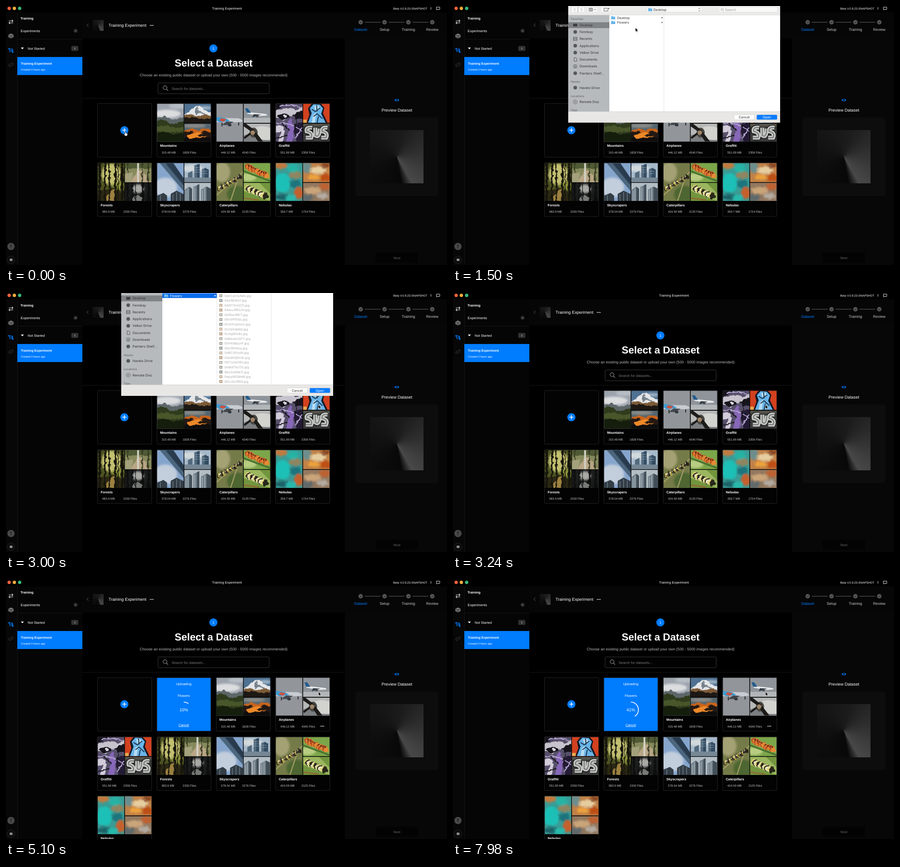
Animation of 976x574 px, one loop 8 s. Source, as an HTML page:

```html
<!DOCTYPE html>
<html lang="en">
<head>
<meta charset="utf-8">
<title>Training Experiment</title>
<style>
  html, body { margin: 0; width: 100%; height: 100%; overflow: hidden; background: #000; }
  #stage { position: relative; width: 976px; height: 574px; overflow: hidden; }
  #stage > svg { position: absolute; inset: 0; }
  text { font-family: "Liberation Sans", Arial, sans-serif; fill: #fff; text-rendering: geometricPrecision; white-space: pre; }
  #sheet text { font-family: Inter, sans-serif; fill: #333; }
  .cone { position: absolute; background: conic-gradient(from 150deg, #484848, #262626 10deg, #080808 20deg, #0c0c0c 80deg, #141414 160deg, #1c1c1c 225deg, #333 300deg, #484848); }
</style>
</head>
<body>
<div id="stage">
  <svg id="view" width="976" height="574"></svg>
  <div class="cone" style="left:806px;top:275px;width:118px;height:118px"></div>
  <div class="cone" style="left:192px;top:31px;width:24px;height:24px"></div>
</div>
<script>
const BLUE = '#007cff';

// Shape helpers; text is placed by its vertical centre.
const path = (fill, d, more = '') => `<path fill="${fill}" d="${d}" ${more}/>`;
const line = (color, width, d, more = '') =>
  `<path fill="none" stroke="${color}" stroke-width="${width}" d="${d}" ${more}/>`;
const oval = (fill, x, y, rx, ry = rx, more = '') =>
  `<ellipse fill="${fill}" cx="${x}" cy="${y}" rx="${rx}" ry="${ry}" ${more}/>`;
const box = (fill, x, y, w, h, more = '') =>
  `<rect fill="${fill}" x="${x}" y="${y}" width="${w}" height="${h}" ${more}/>`;
const text = (x, y, size, str, more = '') =>
  `<text x="${x}" y="${y + size * .36}" font-size="${size}" ${more}>${str}</text>`;
const MID = 'text-anchor="middle"', BOLD = 'font-weight="700"';
const plus = (x, y, r, color, width) => line(color, width, `M${x - r} ${y}h${2 * r}M${x} ${y - r}v${2 * r}`);
const dots = (x, y) => [-3, 0, 3].map(d => oval('#fff', x + d, y, 1)).join('');
const lens = (x, y, r, color) =>
  line(color, r / 4, `M${x + r * .7} ${y + r * .7}l${r * .9} ${r * .9}`) +
  `<circle cx="${x}" cy="${y}" r="${r}" fill="none" stroke="${color}" stroke-width="${r / 4}"/>`;

// Photo helpers: backdrops overlap the edges so that roughened shapes leave no gap.
const fill = color => box(color, -8, -8, 75, 100);
const soft = shapes => `<g filter="url(#soft)">${shapes}</g>`;
const rough = shapes => `<g filter="url(#rough)">${shapes}</g>`;
const bars = (color, list) => list.map(([x, w]) => box(color, x, -5, w, 94)).join('');
const beads = (n, x, y, dx, dy, r, colors) => Array.from({ length: n }, (_, i) =>
  oval(colors[i % colors.length], x + dx * i, y + dy * i, r)).join('');
const LETTERS = 'M20 9Q6 7 8 17Q22 20 18 31L6 31M27 9V26Q36 33 37 11M54 9Q41 7 42 17Q56 20 51 31L40 31';

// Three photos per set: tall (59 x 84), upper (59 x 42), lower (59 x 40).
const SETS = [
  ['Mountains', '315.48 MB', '1828 Files',
    fill('#9ca3ad') + soft(oval('#dcdddf', 22, 22, 30, 9) + oval('#b7bdc5', 46, 5, 20, 6)) +
    rough(path('#5d6668', 'M-5 34L14 27L34 36L65 28V60H-5Z') + path('#2f3b1c', 'M-5 39L12 34L30 45L48 42L65 36V92H-5Z') +
      path('#48562a', 'M-5 52L20 48L44 54L65 48V60L30 64L-5 60Z') + path('#151d0c', 'M-5 66L20 62L36 68L65 63V92H-5Z')),
    fill('#4f7192') + soft(oval('#9db2c4', 46, 9, 16, 4)) +
    rough(path('#e4e6e8', 'M-5 27L12 15L27 4L36 6L46 14L65 23V48H-5Z') +
      path('#77828c', 'M29 5L31 14L42 20L51 25L33 20L24 25L25 13Z') + path('#7c5a38', 'M-5 26L14 23L27 29L43 23L65 28V48H-5Z') +
      path('#1d1814', 'M-5 31L22 30L36 34L65 31V48H-5Z')),
    fill('#53656f') + soft(oval('#8f8d87', 22, 5, 26, 4)) +
    rough(path('#c8641c', 'M-5 19L15 10L29 15L45 9L65 17V46H-5Z') + path('#231813', 'M-5 22L14 15L28 25L44 15L65 23V46H-5Z') +
      path('#ec8828', 'M6 26L31 18L40 22L26 27L54 29L10 33Z') + path('#0f0d0c', 'M-5 33L26 33L65 30V46H-5Z'))],
  ['Airplanes', '446.12 MB', '4340 Files',
    fill('#92959a') + path('#c7cdd3', 'M0 31L48 32Q57 34 58 39L50 41L0 41Z') +
    path('#3f9bd0', 'M0 29L20 32L30 38L7 41L0 37Z') + path('#c95444', 'M10 32L22 34L16 40L6 37Z') +
    path('#43484f', 'M22 39L38 40L25 47H12Z') + oval('#33383d', 29, 47, 4, 3) + line('#24272a', 2, 'M12 42V50M49 41V48'),
    fill('#8e949a') + box('#b3b6b8', 0, 31, 59, 11) + path('#e6e8e9', 'M6 18L45 22Q54 23 51 26L35 27L8 22Z') +
    path('#245b8c', 'M3 10L9 10L16 20L7 20Z') + path('#353d47', 'M22 23L38 24L19 30Z') + oval('#4b5157', 30, 28, 3, 2),
    fill('#b6b8b8') + path('#7b7f81', 'M0 26L20 20L59 30V40H0Z') + path('#d2d2cf', 'M22 10Q40 2 59 9V36Q37 38 22 29Z') +
    oval('#4a4742', 22, 20, 9, 11) + path('#1c1b1a', 'M20 20L0 6V0H5L26 16ZM20 22L32 40H43L27 19ZM17 23L2 34L0 30L16 18Z') +
    oval('#9c8467', 20, 20, 5)],
  ['Graffiti', '551.99 MB', '2358 Files',
    fill('#57506b') + rough(path('#c6c3cd', 'M-5 18Q22 4 45 14L65 4V24Q36 19 19 38L-5 30Z') +
      path('#17141c', 'M2 27Q20 16 32 28Q22 38 7 34ZM38 24L57 15L65 31L43 34ZM-5 -5H28L9 10L-5 16Z') + oval('#d7d7dd', 20, 28, 4, 3) +
      path('#8767b8', 'M31 31Q46 49 35 92H21Q29 60 24 45Z') + path('#d2cbd9', 'M-5 50Q17 44 21 60L12 92H4L11 62L-5 66Z') +
      path('#231a33', 'M39 48L65 38V78L46 92Z') + line('#b3a6d0', 2.5, 'M0 43Q31 39 59 61M41 78L58 53M8 6Q30 -2 59 10') +
      line('#17141c', 2.5, 'M0 76L24 70M14 44L30 60M46 36L40 60')),
    fill('#d3411f') + path('#121b29', 'M8 42L14 24L11 10L20 -2H38L47 9L44 21L54 42Z') +
    path('#69b4e8', 'M11 42L19 21L15 10L23 1L37 2L44 10L40 22L50 42Z') + path('#b7dcf2', 'M24 5L34 4L37 11L28 15ZM22 24L29 20L26 42H19Z') +
    line('#183048', 2, 'M19 12L27 17L38 9M23 28L31 22L43 33M30 3L31 17M31 42L34 28') + box('#e5ab52', 0, 35, 8, 7),
    fill('#3a3b3a') + box('#55534c', 0, 0, 59, 6) + line('#141414', 12, LETTERS) + line('#c3c5c2', 9, LETTERS) + line('#6f7170', 2, LETTERS)],
  ['Forests', '983.9 MB', '2330 Files',
    fill('#4c5220') + soft(oval('#c2bf70', 30, 25, 22, 24) + oval('#8d953a', 47, 50, 15, 9)) +
    rough(path('#2c2814', 'M-5 62L31 56L65 66V92H-5Z') + path('#9c8040', 'M14 84L29 60L41 60L36 84Z') +
      bars('#17160d', [[1, 6], [14, 4], [24, 3], [37, 4], [44, 2], [51, 6]])),
    fill('#86895c') + rough(box('#4f5a35', -5, -5, 70, 17) + path('#b9a686', 'M10 48L28 15L36 15L62 48Z') +
      bars('#34381f', [[5, 2], [37, 2], [50, 3]]) + path('#a3a17c', 'M-5 25L19 19L14 48H-5Z')) + bars('#d3d2c5', [[27, 4]]),
    fill('#1b1c1c') + soft(oval('#a8a9a5', 29, 13, 13, 10)) +
    rough(path('#777976', 'M2 46L23 28L33 28L52 46Z') + path('#191a19', 'M-5 27L25 25L10 46H-5ZM36 26L65 29V46H45Z') +
      bars('#0d0e0e', [[3, 5], [14, 3], [23, 2], [37, 4], [50, 5]]))],
  ['Skyscrapers', '578.04 MB', '2276 Files',
    fill('#86a5cc') + soft(oval('#c3cedc', 18, 54, 26, 22)) + path('#2c3f52', 'M6 0H36L59 34V62Z') +
    path('#4c667e', 'M6 0H18L59 50V62Z') + line('#1c2c3b', 1, 'M24 0L59 43M30 0L59 38') +
    path('#333d46', 'M30 84V68L43 61L59 69V84ZM0 84V72L14 66L22 72V84Z') + line('#8395a3', 1, 'M35 69V84M43 64V84M51 67V84M7 71V84'),
    fill('#a6b9ca') + soft(oval('#d2d9dc', 18, 12, 23, 8)) + path('#536a7d', 'M8 42V22L18 17V42ZM22 42V5L33 2V42ZM39 42V13L49 10V42Z') +
    path('#324b61', 'M28 42V3L34 2V42ZM45 42V11L54 14V42Z') + box('#768795', 0, 32, 59, 10) +
    line('#acbcc7', .7, 'M23 10H33M23 15H33M23 20H33M40 18H51M40 23H51'),
    fill('#b3bdc4') + path('#707f89', 'M0 40V16L11 8L17 13V40ZM20 40V9L33 3V40ZM37 40V15L49 8L59 13V40Z') +
    path('#424f58', 'M11 40V9L17 13V40ZM28 40V5L33 3V40ZM49 40V8L59 13V40Z') +
    line('#c3ccd1', 1, 'M4 17V40M8 13V40M23 11V40M40 16V40M45 12V40')],
  ['Caterpillars', '424.59 MB', '2125 Files',
    fill('#757b48') + soft(oval('#a4a174', 12, 20, 18, 22) + oval('#4d6631', 46, 69, 23, 19)) +
    line('#a09b63', 2.5, 'M0 71L59 19M31 84L47 35') +
    rough(beads(16, 5, 57, 3.1, -1.75, 5, ['#29251c', '#b8a849', '#55523e']) + beads(8, 7, 53, 6, -3.4, 1.5, ['#e2d9ad'])),
    fill('#7ca64a') + soft(oval('#b9cd82', 10, 31, 18, 9)) + line('#4b7430', 4, 'M0 18L59 40') +
    rough(beads(14, 8, 8, 3.3, 1.5, 6, ['#bc5024', '#e58a35']) + beads(8, 11, 6, 5.5, 2.5, 1.7, ['#4a2518'])),
    fill('#72953e') + path('#9bb65e', 'M0 0H35L59 24V40L0 18Z') +
    rough(beads(14, 9, 12, 3, 1.3, 7, ['#e0d377', '#28281a', '#e7e4bd'])) + line('#8d6934', 3, 'M0 34L34 38')],
  ['Nebulas', '359.7 MB', '1724 Files',
    fill('#3a9c96') + rough(soft(oval('#1fc0b6', 14, 44, 17, 22) + oval('#c07a40', 9, 5, 17, 8) + oval('#26b3a4', 38, 12, 12, 10) +
      oval('#8f8560', 44, 27, 15, 8) + oval('#1d747c', 43, 46, 12, 10) + oval('#c4602f', 51, 66, 10, 14) +
      oval('#1f6268', 14, 75, 17, 7) + oval('#28b9ac', 32, 78, 10, 8))),
    fill('#c08148') + rough(soft(oval('#e6cda0', 33, 16, 18, 8) + oval('#bd4f18', 49, 32, 13, 9) +
      oval('#6d8d8d', 6, 9, 11, 13) + oval('#eba23c', 24, 31, 14, 6) + oval('#8a4622', 50, 5, 11, 6))),
    fill('#92785f') + rough(soft(oval('#cba57a', 21, 17, 19, 8) + oval('#5f696c', 7, 33, 16, 8) +
      oval('#bd6231', 48, 8, 13, 8) + oval('#b3aaa0', 43, 29, 13, 7)))]
];

const slot = i => `translate(${202 + 131.4 * (i % 4)} ${215.5 + 131.4 * Math.floor(i / 4)})`;
const photo = (x, y, h, art) => `<svg x="${x}" y="${y}" width="58.5" height="${h}">${art}</svg>`;
const frame = box('#030303', .5, .5, 120, 119, 'rx="1.5" stroke="#242424"');
const card = ([name, size, files, tall, upper, lower]) => `<g class="card">${frame}
  ${photo(1.2, 1.3, 83.7, tall)}${photo(61.3, 1.3, 42.2, upper)}${photo(61.3, 45.2, 39.8, lower)}
  ${text(7.5, 94, 7.4, name, BOLD)}
  ${text(11, 108.8, 6.5, `${size}<tspan x="57.7">${files}</tspan>`, 'style="fill:#ccc"')}</g>`;

const steps = ['Dataset', 'Setup', 'Training', 'Review'].map((name, i) => {
  const x = 785 + 52.8 * i;
  return oval('#555', x, 36, 5) + line('#111', 1, `M${x - 2} 36l1.6 1.7l3 -3.2`) +
    (i < 3 ? line('#6a6a6a', 1, `M${x + 9} 36h35`) : '') +
    text(x, 52, 8.3, name, `${MID} style="fill:${i ? '#ccc' : BLUE}"`);
}).join('');

const rail =
  line('#ddd', 1.2, 'M6 33H15M13 30.5L15.5 33L13 35.5M16 37.5H7M9 35L6.5 37.5L9 40') +
  path('#777', 'M11 61L16.8 63.5V69L11 72L5.2 69V63.5Z') + line('#161616', 1, 'M5.5 64L11 66.5L16.5 64M11 66.5V71.5M8 68V69.5M14 68V69.5') +
  line(BLUE, 1.2, 'M6 95H14V98H8V101H16') + [[7, 95], [14, 98], [15, 102]].map(p => oval(BLUE, ...p, 1.8)).join('') +
  line('#333', 1.2, 'M10 129L12 127Q14 125 15.5 127Q16.5 129 14.5 131L13 132M12 131L10 133Q8 135 6.5 133Q5.5 131 7.5 129L9 128') +
  oval('#484848', 11, 533, 8) + line('#161616', 1, 'M11 537V529M8.5 531.5L11 529L13.5 531.5') +
  oval('#0c0c0c', 11, 562.5, 8.5, 8.5, 'stroke="#242424"') + box('#bbb', 8.5, 560, 5.5, 5) + line('#222', 1, 'M10 561.7H13M10 563.7H12');

const app =
  box('#070707', 0, 13, 25, 561) + box('#050505', 25, 14, 144, 560) + box('#060606', 169, 14, 807, 58) +
  box('#070707', 750, 72, 226, 502) + line('#151515', 1, 'M25 73.5H169M169 204.5H750M25.5 14V574') +
  oval('#f2603f', 7, 5.3, 3.7) + oval('#f4ad3c', 18.5, 5.3, 3.7) + oval('#35ba7c', 30.2, 5.3, 3.7) +
  text(489, 5.3, 7.4, 'Training Experiment', MID) + text(857, 5.3, 6.4, 'Beta V.0.9.23-SNAPSHOT') +
  line('#ddd', 1, 'M940.5 2.5V8M952.5 2.5H960V7.5H955.5L953.5 9V7.5H952.5Z') +
  text(32, 27, 7.4, 'Training', BOLD) + text(32.5, 55, 7.7, 'Experiments') +
  oval('#1e1e1e', 154, 55, 5) + plus(154, 55, 2.5, '#777', 1) +
  path('#fff', 'M33 92H39.5L36.2 96Z') + text(48, 94, 7.5, 'Not Started') +
  box('#333', 144.5, 88.5, 15.5, 11, 'rx="2"') + text(152.2, 94, 5.5, '1', MID) +
  box(BLUE, 25, 113, 144, 40) + text(33, 127.5, 7.15, 'Training Experiment', BOLD) + text(33, 141, 5.9, 'Created 3 hours ago') +
  rail + line('#666', 1, 'M182.5 39L179 42.5L182.5 46') + text(227, 43, 9.4, 'Training Experiment') + dots(322.5, 43) + steps +
  oval(BLUE, 459, 94, 9) + text(459, 94, 8, '1', MID) +
  text(459.5, 125.5, 22.5, 'Select a Dataset', `${MID} ${BOLD}`) +
  text(459.5, 153, 8.26, 'Choose an existing public dataset or upload your own (500 - 5000 images recommended)', `${MID} style="fill:#bbb"`) +
  box('#020202', 336.5, 170.5, 246, 24, 'rx="2.5" stroke="#363636"') + lens(352, 181, 4.2, '#aaa') +
  text(366.5, 182.7, 7.9, 'Search for datasets...', 'style="fill:#777"') +
  path(BLUE, 'M859.5 208.5Q865 202.5 870.5 208.5Q865 214.5 859.5 208.5Z') + oval('#070707', 865, 208.5, 2.4) + oval(BLUE, 865, 208.5, 1.1) +
  text(865, 230.5, 9.35, 'Preview Dataset', MID) + box('#0d0d0d', 773, 247, 184, 174, 'rx="6"') +
  box('#030303', 818, 547, 94, 22, 'rx="2"') + text(865, 558, 7.6, 'Next', `${MID} style="fill:#666"`);

const upload = `<g id="upload" transform="${slot(1)}">${frame}${box(BLUE, 1, 1.5, 118.5, 117.5)}
  ${text(60, 15, 7.55, 'Uploading', MID)}${text(60, 40.5, 7.7, 'Flowers', MID)}
  <circle id="ring" cx="60" cy="72" r="17" fill="none" stroke="#fff" stroke-width="1.7" pathLength="100" transform="rotate(-90 60 72)"/>
  ${text(60, 72, 9.5, '', `${MID} id="percent"`)}
  ${text(60, 105.5, 7.4, 'Cancel', `${MID} text-decoration="underline"`)}</g>`;

// File sheet
const folder = (x, y) => path('#62b2e9', `M${x} ${y - 3.5}h3.5l1 1h4.5v6h-9Z`) + line('#a5d7f6', .7, `M${x} ${y - 1.3}h9`);
const places = ['Desktop', 'Fennbay', 'Recents', 'Applications', 'Velkor Drive', 'Documents', 'Downloads', 'Painters Shelf...'];
const glyphs = {
  Desktop: y => box('#3c3e40', 266, y - 3, 9, 6),
  Recents: y => box('none', 266.5, y - 3.5, 8, 7, 'stroke="#505356"') + line('#505356', .8, `M267 ${y - 1}h7M267 ${y + 1}h7`),
  Documents: y => line('#505356', 1, `M268 ${y - 4}h4l2 2v6h-6Z`),
  Downloads: y => oval('none', 270.5, y, 4, 4, 'stroke="#505356"') + line('#505356', 1, `M270.5 ${y - 2}v4m-2 -2l2 2l2 -2`),
  'Remote Disc': y => oval('none', 270.5, y, 4.5, 4.5, 'stroke="#686b6e"') + oval('none', 270.5, y, 1.8, 1.8, 'stroke="#686b6e"')
};
const place = (name, y) => (glyphs[name] || (v => oval('#55585b', 270.5, v, 4)))(y) + text(280, y, 7.4, name);
const heading = (name, y) => text(260.5, y, 6.4, name, 'font-weight="500" style="fill:#66696c"');
const files = ['0a4mXq8Rt', '0aKCylr4UMA', '0Ao9Ei6Iz7', '0AQT1mVZZt', '0AwuJRRLmf', '0b1Ekof6KT', '0bn3fFB3jc', '0C4rFsdmzm',
  '0cCb5iqNlQ', '0cstgWls8z', '0dKwaVcQYY', '0DmtsBpyxF', '0Do191Hlza', '0dRC3FjnsN', '0dsdHQDroK', '0DTJz4zhEk',
  '0eIBdTkUTO', '0Eo3zW8kTl', '0epiyM2MwB', '0EVJQvff6N'];
const tints = ['#b6b0a8', '#c9b49d', '#a9a69f', '#b99f86', '#8f9590'];
const fileRows = files.map((name, i) => {
  const y = 26 + 10.56 * i;
  return box(tints[i * 7 % 5], 472, y - 3.2, 7, 6.4) + box('#e3ddd4', 473.7, y - 1.2, 3.5, 2.4) +
    text(483.5, y, 7, name + '.jpg', 'style="fill:#aaa"');
}).join('');

const sheet = `<g id="sheet">${box('#fff', 255, 0, 469, 258)}${box('#b7babd', 255, 20, 91, 215)}
  ${box('#808386', 255, 36, 91, 13)}${line('#ddd', .8, 'M466.8 20V234')}
  ${heading('Favorites', 29)}${places.map((name, i) => place(name, 42.3 + 15.25 * i)).join('')}
  ${heading('Havelo', 168)}${place('Havelo Drive', 181)}${heading('Locations', 199.5)}${place('Remote Disc', 212.5)}${heading('Tags', 231)}
  <g id="list">${folder(350, 26)}${text(363, 26, 7.2, 'Desktop')}${path('#777', 'M461.5 24L465 26L461.5 28Z')}
    <g id="picked">${box('#0a6bea', 346, 31.2, 120.5, 10.4)}${fileRows}${line('#ddd', .8, 'M587 20V234')}</g>
    ${folder(350, 36.5)}${text(363, 36.5, 7.2, 'Flowers', 'id="flowers"')}<path id="flowersArrow" d="M461.5 34.5L465 36.5L461.5 38.5Z"/></g>
  ${box('#ebebea', 255, 0, 469, 20)}${line('#d0d0d0', .7, 'M255 20H724')}
  ${[[262, 29], [297, 23], [327, 23], [429, 122], [589, 129]].map(([x, w]) => box('#f9f9f9', x, 2, w, 11.5, 'rx="2" stroke="#d8d8d8" stroke-width=".7"')).join('')}
  ${line('#999', 1, 'M270.5 5L268 8L270.5 11M283 5L285.5 8L283 11M276.5 2V13')}
  ${line('#555', 1, 'M301 5H309V11H301ZM303.7 5V11M306.4 5V11M312.5 7L314.5 9L316.5 7M334 5H343V11H334ZM345 4V7M343.5 5.5H346.5')}
  ${folder(432, 8)}${text(443.5, 8, 7.4, 'Desktop')}${line('#555', 1, 'M543.3 6.5L545.3 4.5L547.3 6.5M543.3 9.5L545.3 11.5L547.3 9.5')}
  ${lens(595.5, 7.5, 2.5, '#777')}${text(602, 8, 7.4, 'Search', 'style="fill:#999"')}
  ${box('#e8e7e5', 255, 234, 469, 24.5)}${line('#ccc', .7, 'M255 234H724')}
  ${box('#fff', 622, 241, 45, 11, 'rx="2" stroke="#ccc" stroke-width=".7"')}${text(644.5, 246.7, 7.4, 'Cancel', MID)}
  <rect id="open" x="672" y="241" width="45.5" height="11" rx="2" stroke="#ccc" stroke-width=".7"/>${text(694.8, 246.7, 7.4, 'Open', `${MID} id="openText"`)}</g>`;

const cursors = `<g id="cursor">
  ${path('#000', 'M0 0V9L2 7.2L3.4 10.2L5 9.5L3.6 6.6H6.4Z', 'id="arrow" stroke="#fff" stroke-width=".7"')}
  ${path('#fff', 'M-1 1Q0 -.8 1 1V4L4.5 5Q5.5 5.4 5 7L4 10.5H-.5L-3 6.5Q-3 5 -1 6Z', 'id="hand" stroke="#000" stroke-width=".7"')}</g>`;

const filters = `<defs>
  <filter id="soft" x="-30%" y="-30%" width="160%" height="160%"><feGaussianBlur stdDeviation="2.2"/></filter>
  <filter id="rough" x="-10%" y="-10%" width="120%" height="120%" color-interpolation-filters="sRGB">
    <feTurbulence type="fractalNoise" baseFrequency=".13" numOctaves="3" seed="4"/>
    <feDisplacementMap in="SourceGraphic" scale="7" xChannelSelector="R" yChannelSelector="G"/></filter></defs>`;

const $ = id => document.getElementById(id);
$('view').innerHTML = filters + app + `<g transform="${slot(0)}">${frame}</g>` +
  oval(BLUE, 262, 275.3, 9) + plus(262, 275.3, 4.5, '#fff', 1.5) +
  SETS.map(card).join('') + upload + `<g id="hover">${dots(700, 324)}</g>` + sheet + cursors;
const cards = [...document.querySelectorAll('.card')];

// Tables of [time, ...values], interpolated linearly between rows.
const SLIDE = [[720, -262], [780, -245], [840, -180], [900, -85], [960, -18], [1020, 0],
  [2940, 0], [3000, -30.5], [3060, -125], [3120, -220], [3180, -262]];
const POINTER = [[1020, 264, 277.5], [1440, 403.7, 48], [1680, 403.7, 48], [1920, 386, 36], [2160, 386, 36], [2640, 691.5, 247.5]];
const UPLOAD_AT = 4140, LOOP = 8000, TICK = 60;

function at(table, t) {
  const next = table.findIndex(row => row[0] > t);
  if (next === 0) return table[0].slice(1);
  if (next < 0) return table[table.length - 1].slice(1);
  const a = table[next - 1], b = table[next], k = (t - a[0]) / (b[0] - a[0]);
  return a.slice(1).map((v, i) => v + (b[i + 1] - v) * k);
}
const show = (id, on) => { $(id).style.display = on ? '' : 'none'; };

function render(now) {
  const t = Math.floor(now % LOOP / TICK) * TICK;
  const uploading = t >= UPLOAD_AT, ready = t >= 1020, picked = t >= 1980;

  cards.forEach((c, i) => c.setAttribute('transform', slot(i + (uploading ? 2 : 1))));
  show('upload', uploading);
  show('hover', uploading);
  const percent = Math.max(0, 10.2 + (t - 5100) * 31 / 2880);
  $('percent').textContent = Math.floor(percent) + '%';
  $('ring').setAttribute('stroke-dasharray', `${percent} 200`);

  $('sheet').setAttribute('transform', `translate(0 ${at(SLIDE, t)[0]})`);
  show('list', ready);
  show('picked', picked);
  $('flowers').style.fill = picked ? '#fff' : '#333';
  $('flowersArrow').style.fill = picked ? '#fff' : '#777';
  $('open').style.fill = ready ? '#087bff' : '#fff';
  $('openText').style.fill = ready ? '#fff' : '#333';

  $('cursor').setAttribute('transform', `translate(${at(POINTER, t).join(' ')})`);
  show('hand', !ready);
  show('arrow', ready);
}

const start = performance.now();
function loop() {
  render(performance.now() - start);
  requestAnimationFrame(loop);
}
loop();
</script>
</body>
</html>
```
